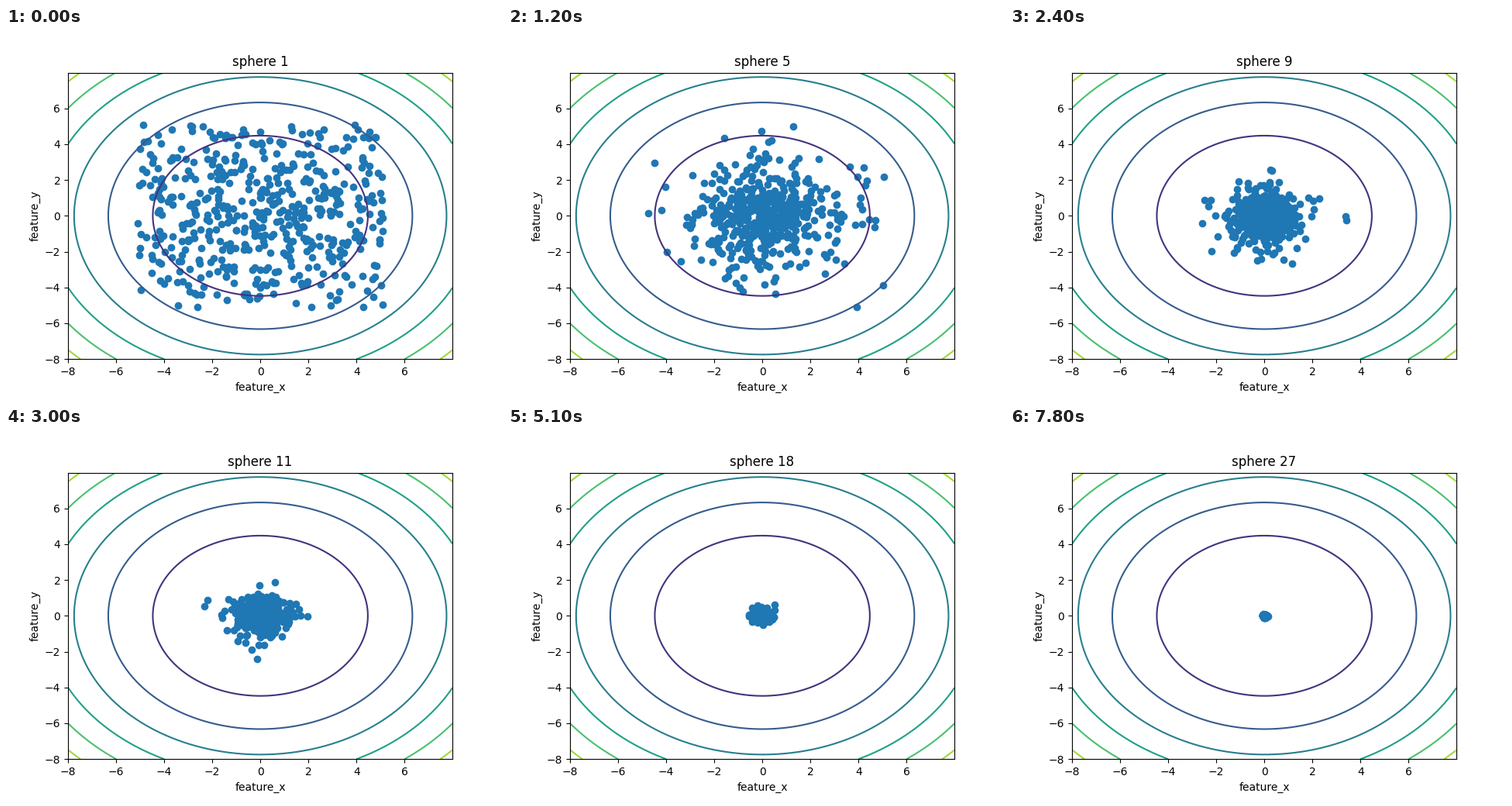
Write a matplotlib script that moves like this. It is 640x480 px and loops after 8 s.

```python
import numpy as np
import matplotlib.pyplot as plt
from matplotlib.animation import FuncAnimation

GENERATIONS = 27
TICK_MS = 100
TICKS_PER_GENERATION = 3
TICKS = 80
LOW, HIGH = -8, 7.99
BOUND = 5.12


def evolve(count=500, seed=4):
    """Greedy search: a trial replaces its parent only if it is closer to 0.

    Trials shrink geometrically; points that miss a few turns become
    stragglers, and inherited coordinates stretch the cloud along the axes.
    """
    rng = np.random.default_rng(seed)
    points = rng.uniform(-BOUND, BOUND, (count, 2))
    for g in range(GENERATIONS):
        spread = 3.75 * 0.831**g
        trial = rng.normal(0, spread, (count, 2))
        inherited = rng.random((count, 2)) < 0.25
        trial = np.where(inherited, points, trial)
        tried = rng.random(count) < 0.65
        inside = np.abs(trial).max(axis=1) < BOUND
        better = np.hypot(*trial.T) < np.hypot(*points.T)
        points = np.where((tried & inside & better)[:, None], trial, points)
        yield points


history = list(evolve())
fig, ax = plt.subplots(figsize=(6.4, 4.8), dpi=100)

axis = np.linspace(LOW, HIGH, 400)
grid_x, grid_y = np.meshgrid(axis, axis)
ax.contour(grid_x, grid_y, grid_x**2 + grid_y**2)
dots = ax.scatter(*history[0].T, color="C0")
ax.set(xlim=(LOW, HIGH), ylim=(LOW, HIGH),
       xlabel="feature_x", ylabel="feature_y")
title = ax.set_title("sphere 1")


def update(tick):
    g = min(tick // TICKS_PER_GENERATION, GENERATIONS - 1)
    dots.set_offsets(history[g])
    title.set_text(f"sphere {g + 1}")
    return dots, title


anim = FuncAnimation(fig, update, frames=TICKS, interval=TICK_MS,
                     repeat=True, repeat_delay=0)
plt.show()
```
